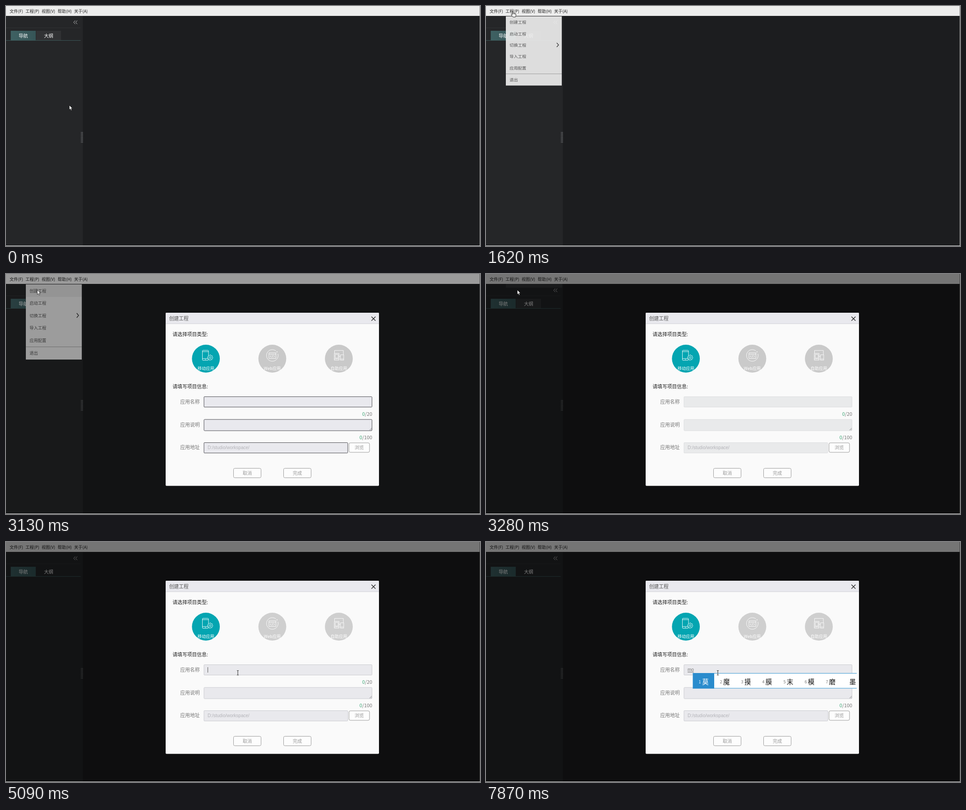
Animation, 1051 px wide and 533 px high, one loop 8000 ms. Source, as an HTML page:

```html
<!DOCTYPE html>
<html lang="zh-CN">
<head>
<meta charset="utf-8">
<title>Create project</title>
<style>
  html, body { margin: 0; width: 100%; height: 100%; overflow: hidden; background: #e4e4e4; }
  svg { display: block; width: 1051px; height: 533px; }
  text { font-family: "Noto Sans CJK SC", "Noto Sans CJK", sans-serif; font-weight: 300; white-space: pre; }
  text.latin { font-family: "Liberation Sans", Arial, sans-serif; font-weight: 400; }
  .field { fill: #e9e9ee; }
</style>
</head>
<body>
<svg id="stage" viewBox="0 0 1051 533"></svg>
<script>
const LOOP = 8000;

// Markup helpers; text is placed by the vertical centre of its glyphs.
const rect = (x, y, w, h, fill, more = '') =>
  `<rect x="${x}" y="${y}" width="${w}" height="${h}" fill="${fill}" ${more}/>`;
const line = (d, stroke, width = 1, more = '') =>
  `<path d="${d}" fill="none" stroke="${stroke}" stroke-width="${width}" ${more}/>`;
const text = (x, y, size, fill, str, more = '') =>
  `<text x="${x}" y="${y + size * 0.38}" font-size="${size}" fill="${fill}" ${more}>${str}</text>`;
const group = (id, body, more = '') => `<g id="${id}" ${more}>${body}</g>`;
const MID = 'text-anchor="middle"';

function appWindow() {
  const titles = [[8, '文件(F)'], [43.3, '工程(P)'], [79, '视图(V)'], [114.5, '帮助(H)'], [151, '关于(A)']];
  let dots = '';
  for (let i = 0; i < 18; i++)
    dots += rect(166.4 + (i % 2) * 2.6, 280 + (i >> 1) * 2.75, 1.3, 1.4, '#85878a');
  return rect(0, 0, 1050, 22, '#ececec') +
    rect(0, 22, 1050, 510, '#1c1d1f') +
    rect(1050, 0, 1, 532, '#8b8b8b') +
    rect(0, 22, 170.5, 510, '#252628') +
    titles.map(([x, s]) => text(x, 11.7, 9.25, '#222', s)).join('') +
    line('M0 48.5H165', '#313234') +
    line('M153.6 32.2L150 36.2L153.6 40.2M158 32.2L154.4 36.2L158 40.2', '#c5c5c5') +
    rect(10.5, 55, 55.5, 21.5, 'url(#tab)') +
    rect(67, 55, 55, 21.5, '#313234', 'id="tab2"') +
    line('M0 76.5H165.5', '#3c5858') +
    text(38.3, 66.3, 10.3, '#fff', '导航', MID) +
    text(94.5, 66.3, 10.3, '#fff', '大纲', MID) + dots;
}

function projectMenu() {
  const rows = [[37, '创建工程'], [64.7, '启动工程'], [92, '切换工程'], [119.7, '导入工程'], [147.5, '应用配置'], [175.7, '退出']];
  return rect(44, 23, 124, 167, '#ededed') +
    rect(44, 23, 124, 27.7, '#e1e1e1', 'id="hover"') +
    line('M44 161.8H168', '#a4a4a4') +
    line('M156.8 87L161 92L156.8 97', '#222', 1.2) +
    rows.map(([y, s]) => text(52.2, y, 9.25, '#555', s)).join('');
}

function gear(x, y) {
  let d = '';
  for (let i = 0; i <= 32; i++) {
    const a = i * Math.PI / 16, r = i % 4 < 2 ? 6 : 4.7;
    d += `${i ? 'L' : 'M'}${(x + r * Math.cos(a)).toFixed(2)} ${(y + r * Math.sin(a)).toFixed(2)}`;
  }
  return `<path d="${d}Z" fill="#04a5b1" stroke="#fff" stroke-width=".9"/>` +
    `<circle cx="${x}" cy="${y}" r="2.1" fill="none" stroke="#fff" stroke-width=".9"/>`;
}

function dialog() {
  const types = [[443.2, '移动应用'], [590.5, 'Web应用'], [738, '自助应用']];
  const labels = [[283.6, '应用名称'], [334.8, '应用说明'], [385.3, '应用地址']];
  const buttons = [[504.5, 431.5, 61, '取消'], [615.5, 431.5, 61, '完成'], [760.5, 375, 45.5, '浏览']];
  const count = (y, max) => text(812, y, 10.8, '#777',
    `<tspan fill="#3fa878">0</tspan>/${max}`, 'text-anchor="end"');
  const field = (y, w, h, r) => rect(439, y, w, h, '', `class="field" rx="${r}"`);
  return rect(354, 86, 473, 384.5, '#fafafa', 'rx="2"') +
    rect(354, 86, 473, 24, '#e9e9ee', 'rx="2"') +
    line('M354 110.3H827', '#cfcfd4') +
    text(361.7, 98.5, 10.8, '#555', '创建工程') +
    line('M810.3 94.8L819.3 103.8M819.3 94.8L810.3 103.8', '#222', 1.3) +
    text(369.3, 133.5, 10.8, '#222', '请选择项目类型:', 'style="font-weight:500"') +
    text(369.3, 250, 10.8, '#222', '请填写项目信息:', 'style="font-weight:500"') +
    types.map(([x, s], i) =>
      `<circle cx="${x}" cy="188" r="30.9" ${i ? 'class="idle"' : 'fill="#04a5b1"'}/>` +
      text(x, 209, 9.25, '#fff', s, MID + ' style="font-weight:400"')).join('') +
    // phone, browser and kiosk icons
    line('M437 169.5H447.5Q449 169.5 449 171V190Q449 191.7 447.5 191.7H437Q435.5 191.7 435.5 190V171Q435.5 169.5 437 169.5ZM435.5 172.5H449M435.5 187.8H449M441 189.8H443.5', '#fff', .9) +
    gear(452.7, 185.6) +
    line('M602.8 177A12.9 12.9 0 1 1 598.3 170.6M583 175H598.5V187.5H583ZM583 178.2H598.5M588.2 180.5L585.7 182.8L588.2 185M593.2 180.5L595.7 182.8L593.2 185M591.6 180L589.8 185.6', '#fff', .9) +
    '<circle cx="601" cy="173" r="1" fill="#fff"/>' +
    line('M728.5 176V169.8H748V179M728 176.3H738.5V191.3H728ZM728 188.5H738.5M730 178.5H736.5V186.5H730ZM741.5 179.5H748.8V191.3H741.5ZM741.5 188.8H748.8M738.5 183H741.5', '#fff', .9) +
    labels.map(([y, s]) => text(386.3, y, 10.8, '#777', s)).join('') +
    field(272.5, 372.5, 23, 1) + field(323, 372.5, 25, 1.5) + field(374.5, 318.7, 23, 1) +
    line('M806 347L811 342M808.8 347L811 344.8', '#777', .8) +
    count(311.3, 20) + count(362.7, 100) +
    text(447, 385.3, 10, '#b3b3b8', 'D:/studio/workspace/', 'class="latin"') +
    buttons.map(([x, y, w, s]) => rect(x, y, w, 21, '#fdfdfd', 'rx="3" stroke="#999"') +
      text(x + w / 2, y + 10.5, 10.3, '#999', s, MID)).join('');
}

function candidates(chars) {
  return rect(458.5, 291, 363.5, 34.5, '#fff') +
    line('M458.5 291.7H822M458.5 324.8H822', '#2c8fcd') +
    rect(458.5, 291, 47.5, 34.5, '#2a8ccd') +
    [...chars].map((c, i) =>
      (i < 7 ? text(474 + i * 47, 310.8, 9, i ? '#777' : '#fff', i + 1, MID + ' style="font-weight:400"') : '') +
      text(i < 7 ? 486.4 + i * 46.9 : 813, 310, 14.5, i ? '#111' : '#fff', c, MID + ' style="font-weight:400"')).join('');
}

const stage = document.getElementById('stage');
stage.innerHTML =
  '<defs><linearGradient id="tab"><stop stop-color="#3f6163"/><stop offset="1" stop-color="#365557"/></linearGradient></defs>' +
  appWindow() +
  group('menu', projectMenu()) +
  rect(0, 0, 1051, 532, '#000', 'id="shade"') +
  rect(44, 22, 125, 8.5, '#191a1b', 'id="menuRest"') +
  group('dialog',
    dialog() +
    text(447, 283.6, 10, '#777', '', 'class="latin" id="typed"') +
    line('', '#666', 1, 'id="underline"') +
    rect(0, 278, 1, 12, '#555', 'id="caret"')) +
  group('ime1', candidates('吗么没们买妈每美'), 'transform="translate(-6)"') +
  group('ime2', candidates('莫魔摸膜末模磨墨')) +
  group('pointer',
    group('arrow', '<path d="M.4 .4V10.4L2.7 8.3L4.3 11.9L6 11.2L4.4 7.7H7.5Z" fill="#fff" stroke="#111" stroke-width=".7"/>') +
    group('hand', '<path d="M3.3 8.2V1.5Q3.3 .5 4.2 .5T5.2 1.5V5Q7 4.2 7.4 5.4Q9 4.7 9.4 6Q11.2 5.6 11.3 7.2V9.8Q11.2 11.5 10.2 13.4H4.8L1 8.7Q.4 7.5 1.5 7.1Z" fill="#fff" stroke="#111" stroke-width=".9"/>' +
      line('M5.2 5V7.7M7.4 5.4V7.9M9.4 6V8.1', '#111', .6)) +
    group('beam', line('M-2 -5H-.5L0 -4.5L.5 -5H2M0 -4.5V4.5M-2 5H-.5L0 4.5L.5 5H2', '#222', 1)));

const el = id => document.getElementById(id);
const show = (id, on) => el(id).setAttribute('visibility', on ? 'visible' : 'hidden');
const set = (id, attrs) => { for (const k in attrs) el(id).setAttribute(k, attrs[k]); };
const at = (steps, t) => steps.findLast(s => s[0] <= t);

// [time, x, y, shape]; the pointer jumps as in a screen recording.
const POINTER = [
  [0, 140, 220, 'arrow'], [270, 133, 214, 'arrow'], [390, 126, 209, 'arrow'],
  [530, 105, 130, 'arrow'], [660, 84, 51, 'arrow'], [810, 65, 21, 'arrow'],
  [960, 55, 11, 'hand'], [2030, 58, 22, 'hand'], [2180, 65, 33, 'hand'], [2470, 65, 36, 'hand'],
  [3130, 69, 35, 'arrow'], [3520, 122, 68, 'arrow'], [3670, 302, 105, 'arrow'], [3800, 482, 141, 'arrow'],
  [3940, 445, 166, 'hand'], [4070, 416, 193, 'hand'],
  [4590, 455, 232, 'arrow'], [4710, 496, 268, 'arrow'], [4830, 525, 294, 'beam'],
  [4970, 516, 291.5, 'beam'], [5090, 514, 290.5, 'beam']
];
// [time, scale, opacity]
const MENU = [[0, 0, 0], [1620, .92, .92], [1760, .99, .99], [1890, 1, 1], [3280, 0, 0]];
const SHADE = [[0, 0], [3130, .345], [3280, .5]];
const CARET = [[0, 0], [5090, 1], [5620, 0], [6160, 1], [6660, 0], [7050, 1], [7870, 0]];
// [time, text, width]
const TYPED = [[0, '', 0], [7050, 'm', 8.3], [7340, 'mo', 13.9]];
// [time, border, fill, idle circle]
const FIELDS = [[0, '#4b4b50', '#e9e9ee', '#c9c9c9'], [3280, '#dcdddf', '#e9eaeb', '#cacaca'], [3520, '#cacbd0', '#e9e9ed', '#cfcfcf']];

function draw(t) {
  const [, scale, opacity] = at(MENU, t);
  show('menu', scale > 0);
  set('menu', { transform: `translate(0 ${23 * (1 - scale)}) scale(1 ${scale})`, opacity });
  show('hover', t >= 1890);
  show('menuRest', t >= 3280 && t < 3520);
  show('tab2', t < 3520);
  set('shade', { opacity: at(SHADE, t)[1] });

  show('dialog', t >= 3130);
  const [, border, fill, idle] = at(FIELDS, t);
  document.querySelectorAll('.field').forEach(f => { f.style.stroke = border; f.style.fill = fill; });
  document.querySelectorAll('.idle').forEach(c => { c.style.fill = idle; });

  const [, word, width] = at(TYPED, t);
  el('typed').textContent = word;
  set('underline', { d: width ? `M447 289H${447 + width}` : '' });
  set('caret', { x: 447 + width, opacity: at(CARET, t)[1] });
  show('ime1', t >= 7190 && t < 7340);
  show('ime2', t >= 7340);

  const [, x, y, shape] = at(POINTER, t);
  set('pointer', { transform: `translate(${x} ${y})` });
  for (const s of ['arrow', 'hand', 'beam']) show(s, s === shape);
}

const start = performance.now();
function tick() {
  draw((performance.now() - start) % LOOP);
  requestAnimationFrame(tick);
}
tick();
</script>
</body>
</html>
```
